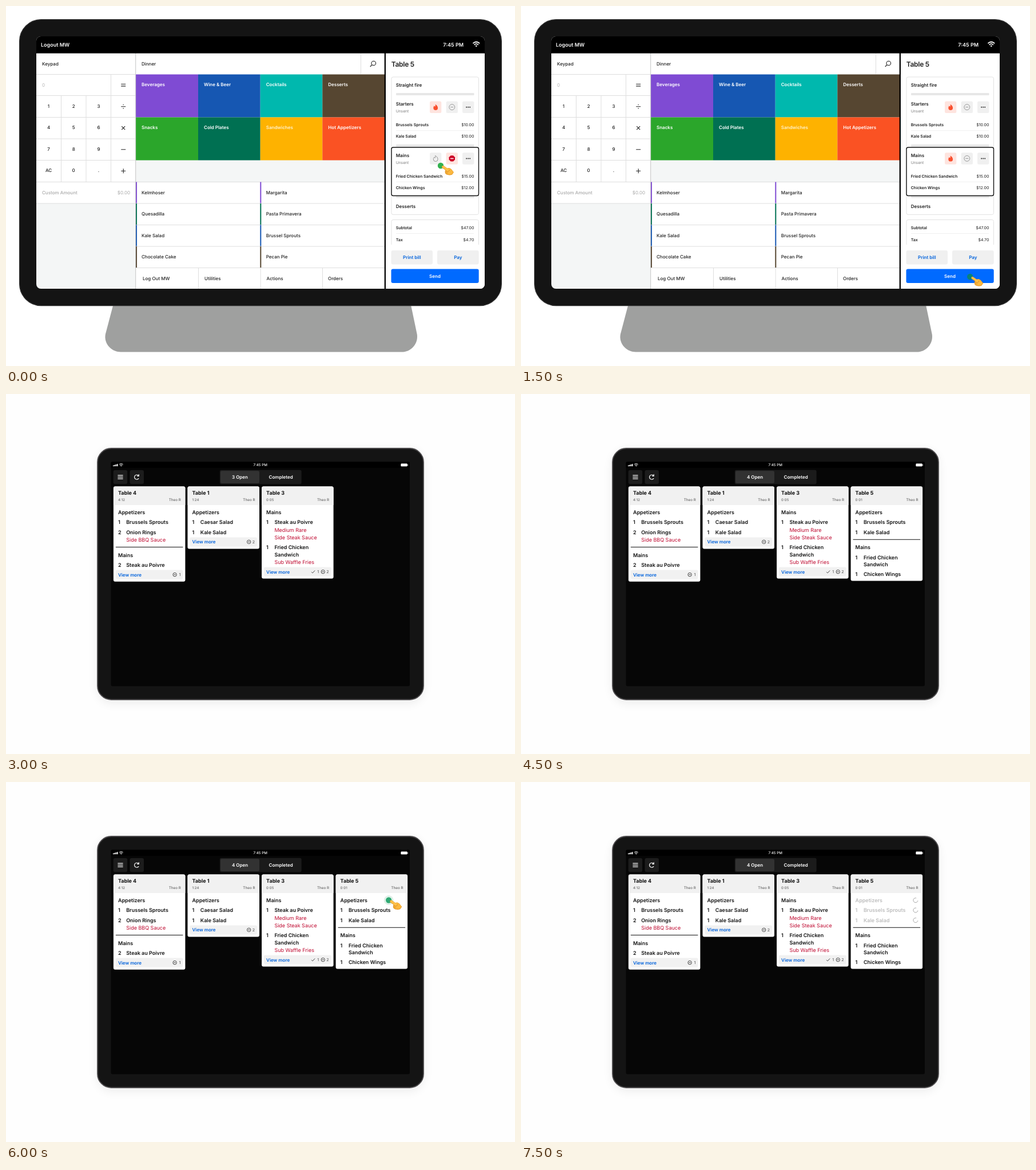
An HTML page that plays this animation: 890 px wide and 629 px high, repeating every 8 s.

```html
<!DOCTYPE html>
<html lang="en">
<head>
<meta charset="utf-8">
<title>Kitchen orders</title>
<style>
html, body { margin: 0; width: 100%; height: 100%; overflow: hidden; background: #fff; }
svg { display: block; width: 100%; height: 100%; }
text { font-family: Inter, "Liberation Sans", sans-serif; text-rendering: geometricPrecision; white-space: pre; }
</style>
</head>
<body>
<svg id="stage" viewBox="0 0 890 629" xmlns="http://www.w3.org/2000/svg"></svg>
<script>
const LOOP = 8000, STEP = 1500;
const stage = document.getElementById('stage');
const INK = '#202020', RULE = '#dedede', PALE = '#f1f1f1', BLUE = '#0062dc', RED = '#bf0a30';
const PURPLE = '#7f4bd3', NAVY = '#1657b2', GREEN = '#007052', BROWN = '#564631';
const SERVER = 'Theo R';

// y is the middle of the capital letters
function text(x, y, s, size = 8, o = {}) {
  const { w = 500, c = INK, a = 'start', ls = 0 } = o;
  return `<text x="${x}" y="${(y + size * 0.364).toFixed(2)}" font-size="${size}" font-weight="${w}" fill="${c}" text-anchor="${a}" letter-spacing="${ls}">${s}</text>`;
}
const rect = (x, y, x2, y2, fill, r = 0, extra = '') =>
  `<rect x="${x}" y="${y}" width="${x2 - x}" height="${y2 - y}" rx="${r}" fill="${fill}" ${extra}/>`;
const path = (d, c, w = 1, extra = '') =>
  `<path d="${d}" fill="none" stroke="${c}" stroke-width="${w}" ${extra}/>`;
const hline = (x, x2, y, c = RULE, w = 1) => path(`M${x} ${y}H${x2}`, c, w);
const vline = (x, y, y2, c = RULE, w = 1) => path(`M${x} ${y}V${y2}`, c, w);
const at = (x, y, s, k = 1) => `<g transform="translate(${x} ${y}) scale(${k})">${s}</g>`;
const circle = (r, fill, extra = '') => `<circle r="${r}" fill="${fill}" ${extra}/>`;

const wifi = (x, y, k) => at(x, y,
  path('M-5.6-1.5Q0-6.6 5.6-1.5M-3.5.8Q0-2.4 3.5.8', '#fff', 1.6) +
  '<path d="M-1.8 2.4Q0 .9 1.8 2.4L0 4.4Z" fill="#fff"/>', k);

const minusRing = (x, y, r, c, w) => at(x, y,
  circle(r, 'none', `stroke="${c}" stroke-width="${w}"`) + hline(-r / 2, r / 2, 0, c, w));

const FLAME = 'M-.6-5C2.2-3.6 3.9-1 3.9 1.2A3.9 3.9 0 0 1-3.9 1.2C-3.9-.5-3-1.8-2.3-2.5C-2-1.6-1.6-1.2-1-1C-.2-2.2-.2-3.6-.6-5Z';

function pointer(x, y, dot, halo) {
  return at(x, y,
    (halo ? circle(8.6, '#000', 'opacity=".07"') + circle(7.8, '#effaf4') + circle(7, 'none', 'stroke="#a9dcc3" stroke-width=".6"') : '') +
    circle(5.2, dot) +
    path('M4.2 2.1L13 8.2', '#d98a1b', 4.4, 'stroke-linecap="round"') +
    '<path d="M8.6 7.2C9.8 5 13.2 3.4 15.8 4.3L18.7 6.1L23 11.4L20.2 15.4C17.6 16.7 12.6 16.8 10.4 15.6C8.6 14.6 7.6 12.9 7.6 11.2C7.5 9.7 8 8.4 8.6 7.2Z" fill="#e79a28"/>' +
    '<path d="M9.2 6.8C11 4.9 13.6 4 15.6 4.8L18.4 6.5L22.2 11.2L19.6 14.4C16.6 15.6 13 15.4 10.8 14.4C9.2 13.5 8.4 12.2 8.4 11Z" fill="#fbb83f"/>' +
    path('M4.2 2L13 7.9', '#fdc14a', 3.4, 'stroke-linecap="round"') +
    path('M8.5 9.6C10.4 9.6 11.8 10 12.8 11M8.6 12.1C10 12 11.4 12.4 12.2 13.2M13.4 9.8Q15.2 9.2 15.4 7.6', '#c9791a', .7, 'stroke-linecap="round"'));
}

function keypad() {
  let s = rect(53, 82, 226.5, 345, '#fff') + text(63, 101, 'Keypad');
  [119.5, 156.5, 194.5, 232, 269.5, 307.5, 345].forEach(y => s += hline(53, 226, y));
  s += vline(96.5, 157, 307) + vline(140, 157, 307) + vline(183.5, 120, 307);
  s += text(63, 138, '0', 8, { c: '#b4b4b4', w: 400 });
  ['1', '2', '3', '4', '5', '6', '7', '8', '9', 'AC', '0', '.'].forEach((k, i) =>
    s += text(74.5 + i % 3 * 43.7, 175 + (i / 3 | 0) * 37.5, k, 8, { a: 'middle' }));
  const ops = ['M-4-1.7H4M-4 1.7H4', 'M-4 0H4M-.7-3.2H.7M-.7 3.2H.7', 'M-3-3L3 3M3-3L-3 3', 'M-4 0H4', 'M-4 0H4M0-4V4'];
  ops.forEach((d, i) => s += at(205.2, 138.2 + i * 37.5, path(d, '#222', 1.1)));
  return s + text(63, 326, 'Custom Amount', 8, { c: '#a8a8a8' }) +
    text(217, 326, '$0.00', 8, { c: '#a8a8a8', w: 400, a: 'end' });
}

function menu() {
  const xs = [227, 336, 444.7, 553.3, 662];
  let s = rect(227, 82, 662, 120, '#fff') + text(237, 101, 'Dinner') + vline(620.5, 83, 119);
  s += at(642.8, 100, circle(3.8, 'none', 'stroke="#222" stroke-width="1.1"') + path('M-2.7 2.7L-6 6', '#222', 1.2));
  [['Beverages', PURPLE], ['Wine &amp; Beer', NAVY], ['Cocktails', '#00b8ae'], ['Desserts', BROWN],
   ['Snacks', '#2ba62b'], ['Cold Plates', GREEN], ['Sandwiches', '#feb200'], ['Hot Appetizers', '#fa5223']
  ].forEach(([name, c], i) => {
    const x = xs[i % 4], y = i < 4 ? 119.5 : 194.5;
    s += rect(x, y, xs[i % 4 + 1], y + 75, c) +
      text(x + 10, y + 18, name, 8, { c: i === 6 ? '#fff3cf' : '#fff', w: 600 });
  });
  s += rect(227, 307, 662, 494, '#fff') + hline(227, 662, 307.5);
  [['Kelmhoser', 'Margarita', PURPLE], ['Quesadilla', 'Pasta Primavera', GREEN],
   ['Kale Salad', 'Brussel Sprouts', NAVY], ['Chocolate Cake', 'Pecan Pie', BROWN]
  ].forEach(([l, r, c], i) => {
    const y = 307.5 + i * 37.5;
    s += hline(227, 662, y + 37.5) + rect(227, y, 229, y + 37, c) + rect(444.3, y, 446.3, y + 37, c) +
      text(237, y + 18.5, l) + text(454.7, y + 18.5, r);
  });
  [336.5, 445.2, 553.5].forEach(x => s += vline(x, 458, 494));
  ['Log Out MW', 'Utilities', 'Actions', 'Orders'].forEach((t, i) =>
    s += text([239, 347, 455.6, 563][i], 476, t));
  return s + vline(226.7, 82, 494, '#c4c4c4');
}

function course(y, name, fired, rows) {
  const top = y + 6, mid = y + 16;
  const lit = '#fee4df', off = '#f0f0f0';
  let s = text(681.7, y + 10.5, name, 8, { w: 600 }) + text(681.7, y + 23, 'Unsent', 6.7, { c: '#7c7c7c', w: 400 });
  s += rect(741, top, 761.3, top + 20.5, fired ? lit : off, 2.5) +
    rect(769.6, top, 790, top + 20.5, fired ? off : lit, 2.5) + rect(798, top, 818.4, top + 20.5, off, 2.5);
  s += at(751.2, mid + .3, fired ? `<path d="${FLAME}" fill="#f9502f"/>` : path(FLAME, '#8a8a8a', .9));
  s += fired ? minusRing(779.8, mid + .2, 4.9, '#8d8d8d', .9)
    : at(779.8, mid + .2, '<path d="M-2.2-5.2H2.2L5.2-2.2V2.2L2.2 5.2H-2.2L-5.2 2.2V-2.2Z" fill="#cc0023"/>' + hline(-2.8, 2.8, 0, '#fff', 1.5));
  s += [-3, 0, 3].map(d => at(808.2 + d, mid + .3, circle(1, '#222'))).join('');
  rows.forEach(([item, price], i) => {
    const ry = y + 47 + i * 20.4;
    s += text(681.7, ry, item, 7, { w: 600 }) + text(818.4, ry, price, 7, { a: 'end', w: 400 });
  });
  return s + hline(682, 818, y + 57.2, '#ededed', .8);
}

function ticket(mainsFired) {
  const edge = 'stroke="#e2e2e2"';
  let s = rect(664, 82, 837, 494, '#fff') + text(673.7, 101.5, 'Table 5', 12, { w: 600, ls: -.25 });
  s += rect(674, 124, 826.5, 364.5, '#fff', 3, edge) + text(681.7, 138.3, 'Straight fire', 8, { w: 600 });
  s += [152, 242, 331.5].map(y => rect(682, y, 818.5, y + 4, '#e7e7e7', 1)).join('');
  s += course(160.5, 'Starters', true, [['Brussels Sprouts', '$10.00'], ['Kale Salad', '$10.00']]);
  s += rect(674, 247, 826.5, 331.5, '#fff', 3, 'stroke="#111" stroke-width="1.4"');
  s += course(250.2, 'Mains', mainsFired, [['Fried Chicken Sandwich', '$15.00'], ['Chicken Wings', '$12.00']]);
  s += text(681.7, 350.5, 'Desserts', 8, { w: 600 });
  s += path('M674 417V376.5Q674 373.5 677 373.5H823.5Q826.5 373.5 826.5 376.5V417', '#e2e2e2');
  [['Subtotal', '$47.00', 387], ['Tax', '$4.70', 408]].forEach(([t, p, y]) =>
    s += text(681.7, y, t, 7, { w: 600 }) + text(818.4, y, p, 7, { a: 'end', w: 400 }));
  s += hline(682, 818, 397.5, '#ededed', .8);
  s += rect(673.5, 427, 746, 451.5, '#f0f0f0', 3) + rect(754, 427, 826.7, 451.5, '#f0f0f0', 3) +
    rect(673.5, 459.5, 826.7, 484, '#006aff', 3);
  const mid = { a: 'middle', w: 600, c: '#0062dc' };
  return s + text(709.8, 439.3, 'Print bill', 8, mid) + text(790.3, 439.3, 'Pay', 8, mid) +
    text(750, 472, 'Send', 8, { ...mid, c: '#fff' });
}

function register(mainsFired, tap) {
  return rect(0, 0, 890, 629, '#fff') +
    '<path d="M188 520H707.5L718.6 573C721.5 589 709 604.5 692 604.5H200.5C183.5 604.5 170.5 589 174 573Z" fill="#9fa09f"/>' +
    rect(23.6, 23.6, 866.4, 523.6, '#141414', 38, 'stroke="#303030" stroke-width="1.2"') +
    '<clipPath id="glass"><rect x="53" y="53" width="784" height="441" rx="8"/></clipPath><g clip-path="url(#glass)">' +
    rect(53, 53, 837, 494, '#f4f6f6') + keypad() + menu() + ticket(mainsFired) +
    rect(661.7, 82, 664, 494, '#000') + rect(53, 53, 837, 82.7, '#000') +
    text(61, 67.5, 'Logout MW', 9, { c: '#fff', w: 600 }) + text(800, 67.5, '7:45 PM', 9, { c: '#fff', w: 600, a: 'end' }) +
    wifi(822.3, 67, 1.05) + '</g>' + tap;
}

// rows: [kind, y, text, count]
function card(x, bottom, table, age, rows, foot) {
  let s = rect(x, 161.5, x + 125.5, bottom, '#fff', 3) +
    `<path d="M${x} 194V164.5q0-3 3-3h119.5q3 0 3 3V194Z" fill="${PALE}"/>`;
  s += text(x + 8, 173, table, 9, { w: 700, c: '#111' }) + text(x + 8, 185.2, age, 6, { c: '#666' }) +
    text(x + 118, 185.2, SERVER, 6.3, { c: '#666', a: 'end' });
  rows.forEach(([kind, y, t, n, dim]) => {
    const c = dim ? '#bdbdbd' : '#141414';
    if (kind === 'head') s += text(x + 8, y, t, 9, { w: 600, c });
    if (kind === 'item') s += text(x + 8, y, n || '', 9, { w: 600, c }) + text(x + 22.3, y, t, 9, { w: 600, c });
    if (kind === 'note') s += text(x + 22.3, y, t, 9, { w: 400, c: RED });
    if (kind === 'rule') s += hline(x + 4, x + 121.5, y, '#111', 1.1);
    if (dim) s += at(x + 113.3, y, path('M1.2-3.8A4 4 0 1 0 4 .6', '#a6a6a6', 1));
  });
  if (foot) {
    const { y, held, done } = foot;
    const grey = '#606060', o = { c: grey, w: 500, a: 'end' };
    s += rect(x + 4, y - 8, x + 121.5, y + 8, PALE, 2) + text(x + 8, y, 'View more', 8, { w: 600, c: BLUE });
    s += minusRing(x + 107.2, y, 3.2, '#444', 1) + text(x + 117.6, y, held, 7, o);
    if (done) s += at(x + 90, y, path('M-3 .2L-1 2.2L3-2.2', '#444', 1)) + text(x + 100, y, done, 7, o);
  }
  return s;
}

function tablet(open, dim, tap) {
  let s = rect(0, 0, 890, 629, '#fefefe') +
    '<filter id="soft" x="-20%" y="-20%" width="140%" height="140%"><feGaussianBlur stdDeviation="9"/></filter>' +
    rect(160, 98, 730, 540, '#000', 26, 'opacity=".07" filter="url(#soft)"') +
    rect(160, 95, 730, 534, '#141414', 24, 'stroke="#4b494b" stroke-width="1.8"') +
    rect(183.5, 118.5, 706, 510.5, '#060606', 3) + rect(183.5, 118.5, 706, 129, '#000', 2);
  s += [0, 1, 2, 3].map(i => rect(187 + i * 2.3, 124.6 - i * .8, 188.7 + i * 2.3, 126.3, '#fff', .3)).join('');
  s += wifi(201.3, 124, .6) + text(444.7, 124.2, '7:45 PM', 6.2, { c: '#fff', a: 'middle' });
  s += rect(690.4, 121.6, 701.8, 126.6, '#fff', 1.3) + rect(702.3, 123.2, 703.2, 125, '#fff', .4);
  s += rect(187.7, 133, 212.2, 157.3, '#1c1c1c', 3) + rect(216.5, 133, 241, 157.3, '#1c1c1c', 3);
  s += at(200, 145.2, path('M-4.6-3H4.6M-4.6 0H4.6M-4.6 3H4.6', '#fff', 1.2));
  s += at(228.6, 145.2, path('M2.8-2.8A4 4 0 1 0 3.5 2M3.6-5V-1.9H.5', '#fff', 1.2));
  s += rect(373.7, 132.7, 516.7, 157.5, '#1b1b1b', 3) + rect(375, 134.2, 443, 156, '#323232', 2.5);
  s += text(409, 145.2, open + ' Open', 8, { c: '#fff', w: 600, a: 'middle' }) +
    text(480.7, 145.2, 'Completed', 8, { c: '#fff', w: 600, a: 'middle' });
  s += card(187.9, 327.7, 'Table 4', '4:12', [
    ['head', 206.6, 'Appetizers'], ['item', 224, 'Brussels Sprouts', 1], ['item', 241.5, 'Onion Rings', 2],
    ['note', 254.7, 'Side BBQ Sauce'], ['rule', 267.5], ['head', 281.3, 'Mains'], ['item', 298.5, 'Steak au Poivre', 2]
  ], { y: 315.6, held: 1 });
  s += card(317.5, 270.5, 'Table 1', '1:24', [
    ['head', 206.6, 'Appetizers'], ['item', 224, 'Caesar Salad', 1], ['item', 241.5, 'Kale Salad', 1]
  ], { y: 258.4, held: 2 });
  s += card(447.1, 322.6, 'Table 3', '0:05', [
    ['head', 206.6, 'Mains'], ['item', 224, 'Steak au Poivre', 1], ['note', 237.4, 'Medium Rare'],
    ['note', 250.6, 'Side Steak Sauce'], ['item', 268, 'Fried Chicken', 1], ['item', 280.3, 'Sandwich'],
    ['note', 293.5, 'Sub Waffle Fries']
  ], { y: 310.6, held: 2, done: 1 });
  if (open > 3) s += card(576.6, 326.6, 'Table 5', '0:01', [
    ['head', 206.6, 'Appetizers', 0, dim], ['item', 224, 'Brussels Sprouts', 1, dim], ['item', 241.5, 'Kale Salad', 1, dim],
    ['rule', 254.3], ['head', 268, 'Mains'], ['item', 285.4, 'Fried Chicken', 1], ['item', 297.7, 'Sandwich'],
    ['item', 315, 'Chicken Wings', 1]
  ]);
  return s + tap;
}

const scenes = [
  register(false, pointer(760, 279, '#32b14e', false)),
  register(true, pointer(785.2, 473, '#0a8277', false)),
  tablet(3, false, ''),
  tablet(4, false, ''),
  tablet(4, false, pointer(669.2, 206.5, '#2fa974', true)),
  tablet(4, true, '')
];

let shown = -1;
const start = performance.now();
function draw(now) {
  const i = Math.floor(Math.max(0, now - start) % LOOP / STEP);
  if (i !== shown) stage.innerHTML = scenes[shown = i];
  requestAnimationFrame(draw);
}
draw(start);
</script>
</body>
</html>
```
